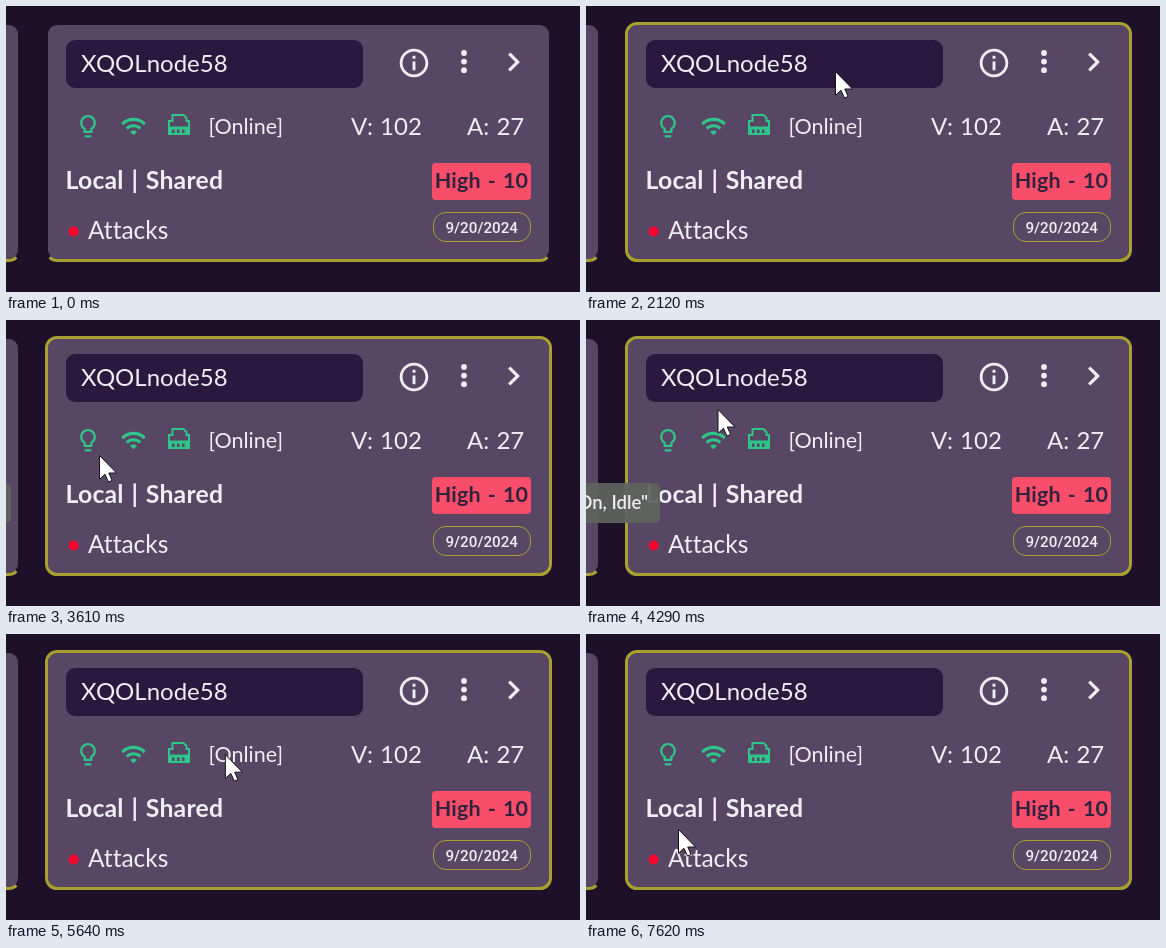
Animation of 574 by 286 pixels, one loop 8 s. Source, as an HTML page:

```html
<!DOCTYPE html>
<html lang="en">
<head>
<meta charset="utf-8">
<title>Device card</title>
<style>
  html, body { margin: 0; width: 100%; height: 100%; overflow: hidden; background: #1e1028; }
  svg { display: block; width: 574px; height: 286px; }
  text { font-family: Lato, "Open Sans", sans-serif; font-size: 24px; font-variant-ligatures: none; fill: #f1edf4; white-space: pre; }
  .bold { font-weight: 700; word-spacing: 1.5px; letter-spacing: .2px; }
  .date { font: 500 15.2px Roboto, sans-serif; }
  .green { fill: #2fc48a; }
  .panel { fill: #574764; }
  .edge { fill: none; stroke: #aaa032; stroke-width: 3; }
</style>
</head>
<body>
<svg viewBox="0 0 574 286">
  <defs>
    <!-- Resting card: only the bottom border is coloured, mitred in the corners -->
    <g id="card">
      <rect class="panel" x="42" y="19" width="501" height="234" rx="9"/>
      <path class="edge" d="M43.58 251.42A10.5 10.5 0 0 0 51 254.5H534A10.5 10.5 0 0 0 541.42 251.42"/>
    </g>
  </defs>
  <rect width="574" height="286" fill="#1e1028"/>
  <use href="#card" x="-531"/>
  <use href="#card"/>
  <rect id="hover" class="edge" x="40.5" y="17.5" width="504" height="237" rx="10.5"/>

  <rect x="60" y="34" width="297" height="48" rx="9" fill="#2a183f"/>
  <text x="75" y="66">XQOLnode58</text>

  <g fill="#f1edf4">
    <path transform="translate(408 57) scale(1.43) translate(-12 -12)" d="M11 7h2v2h-2zm0 4h2v6h-2zm1-9C6.48 2 2 6.48 2 12s4.48 10 10 10 10-4.48 10-10S17.52 2 12 2zm0 18c-4.41 0-8-3.59-8-8s3.59-8 8-8 8 3.59 8 8-3.59 8-8 8z"/>
    <circle cx="458" cy="47" r="2.9"/>
    <circle cx="458" cy="55.6" r="2.9"/>
    <circle cx="458" cy="64.2" r="2.9"/>
    <path transform="translate(508 56) scale(1.6) translate(-12.3 -12)" d="M10 6L8.59 7.41 13.17 12l-4.58 4.59L10 18l6-6z"/>
  </g>

  <g class="green">
    <path transform="translate(82 120.3) scale(1.12) translate(-12 -12)" d="M9 21c0 .55.45 1 1 1h4c.55 0 1-.45 1-1v-1H9v1zm3-19C8.14 2 5 5.14 5 9c0 2.38 1.19 4.47 3 5.74V17c0 .55.45 1 1 1h6c.55 0 1-.45 1-1v-2.26c1.81-1.27 3-3.36 3-5.74 0-3.86-3.14-7-7-7zm2.85 11.1l-.85.6V16h-4v-2.3l-.85-.6C7.8 12.16 7 10.63 7 9c0-2.76 2.24-5 5-5s5 2.24 5 5c0 1.63-.8 3.16-2.15 4.1z"/>
    <path transform="translate(127.5 120.5) scale(1.12) translate(-12 -12.2)" d="M1 9l2 2c4.97-4.97 13.03-4.97 18 0l2-2C16.93 2.93 7.08 2.93 1 9zm8 8l3 3 3-3c-1.65-1.66-4.34-1.66-6 0zm-4-4l2 2c2.76-2.76 7.24-2.76 10 0l2-2C15.14 9.14 8.87 9.14 5 13z"/>
    <path d="M163 128V115H166.5V109H177.5L180.5 112V115H183V128Z" fill="none" stroke="#2fc48a" stroke-width="2"/>
    <path fill-rule="evenodd" d="M163 120.5H183V129H163ZM166 123.5h2.5v3.5h-2.5ZM171 123.5h2.5v3.5h-2.5ZM176 123.5h2.5v3.5h-2.5Z"/>
  </g>
  <text x="202.5" y="128" style="font-size:21.5px">[Online]</text>
  <text x="345" y="129" style="word-spacing:1px">V: 102</text>
  <text x="461" y="129" style="word-spacing:1px">A: 27</text>

  <text class="bold" x="59.5" y="183" style="font-size:24.8px">Local | Shared</text>
  <rect x="426" y="157" width="99" height="37" rx="4" fill="#f94e6a"/>
  <text class="bold" x="475.5" y="182" text-anchor="middle" style="font-size:21.5px;fill:#30233f">High - 10</text>

  <circle cx="67.6" cy="225.5" r="5.1" fill="#f8062f"/>
  <text x="82" y="232.5" style="font-size:24.5px">Attacks</text>
  <rect x="427.5" y="206.5" width="97" height="29" rx="12.5" fill="none" stroke="#aaa032"/>
  <text class="date" x="475.7" y="227" text-anchor="middle">9/20/2024</text>

  <g id="tip">
    <rect x="-160" y="163" width="160" height="40" rx="5" fill="#60645f" fill-opacity=".93"/>
    <text x="-12" y="189" text-anchor="end" style="font-size:18.5px;font-weight:600">"On, Idle"</text>
  </g>
  <path id="cursor" d="M.5 .5V24.3L6 19.3L9.5 27L13.1 25.4L9.8 18H17.5Z" fill="#fff" stroke="#17111c" stroke-linejoin="round"/>
</svg>
<script>
const LOOP = 8000;
const $ = id => document.getElementById(id);
const hover = $("hover"), tip = $("tip"), cursor = $("cursor");

// Pointer stops: time, x, y
const stops = [
  [590, 300, -29], [1320, 255, 58], [2050, 255, 58], [2120, 249, 65],
  [2870, 94, 109], [3140, 93, 135], [3610, 93, 135],
  [4290, 131.5, 89], [4370, 131.5, 89], [4980, 182, 108], [5240, 182, 108],
  [6100, 264, 135], [6770, 264, 135], [7350, 92, 197], [7530, 92, 197], [7620, 92, 195]
];
// Tooltips: right edge, start of fade in, start of fade out
const tips = [[5, 2980, 3640], [74, 4150, 4430], [95, 4780, 5300]];

const clamp = v => Math.min(1, Math.max(0, v));
const ease = u => u * u * (3 - 2 * u);

function pointer(t) {
  const next = stops.findIndex(s => s[0] > t);
  if (next === 0) return stops[0].slice(1);
  if (next < 0) return stops[stops.length - 1].slice(1);
  const a = stops[next - 1], b = stops[next];
  const u = ease((t - a[0]) / (b[0] - a[0]));
  return [a[1] + (b[1] - a[1]) * u, a[2] + (b[2] - a[2]) * u];
}

function draw(t) {
  const [x, y] = pointer(t);
  cursor.setAttribute("transform", `translate(${x} ${y})`);
  hover.setAttribute("visibility", y > 17 ? "visible" : "hidden");

  const shown = tips.find(([, start, end]) => t >= start && t < end + 100);
  tip.setAttribute("visibility", shown ? "visible" : "hidden");
  if (shown) {
    const [right, start, end] = shown;
    tip.setAttribute("transform", `translate(${right} 0)`);
    tip.setAttribute("opacity", clamp((t - start) / 130) * clamp(1 - (t - end) / 100));
  }
}

function tick() {
  draw(performance.now() % LOOP);
  requestAnimationFrame(tick);
}
tick();
</script>
</body>
</html>
```
